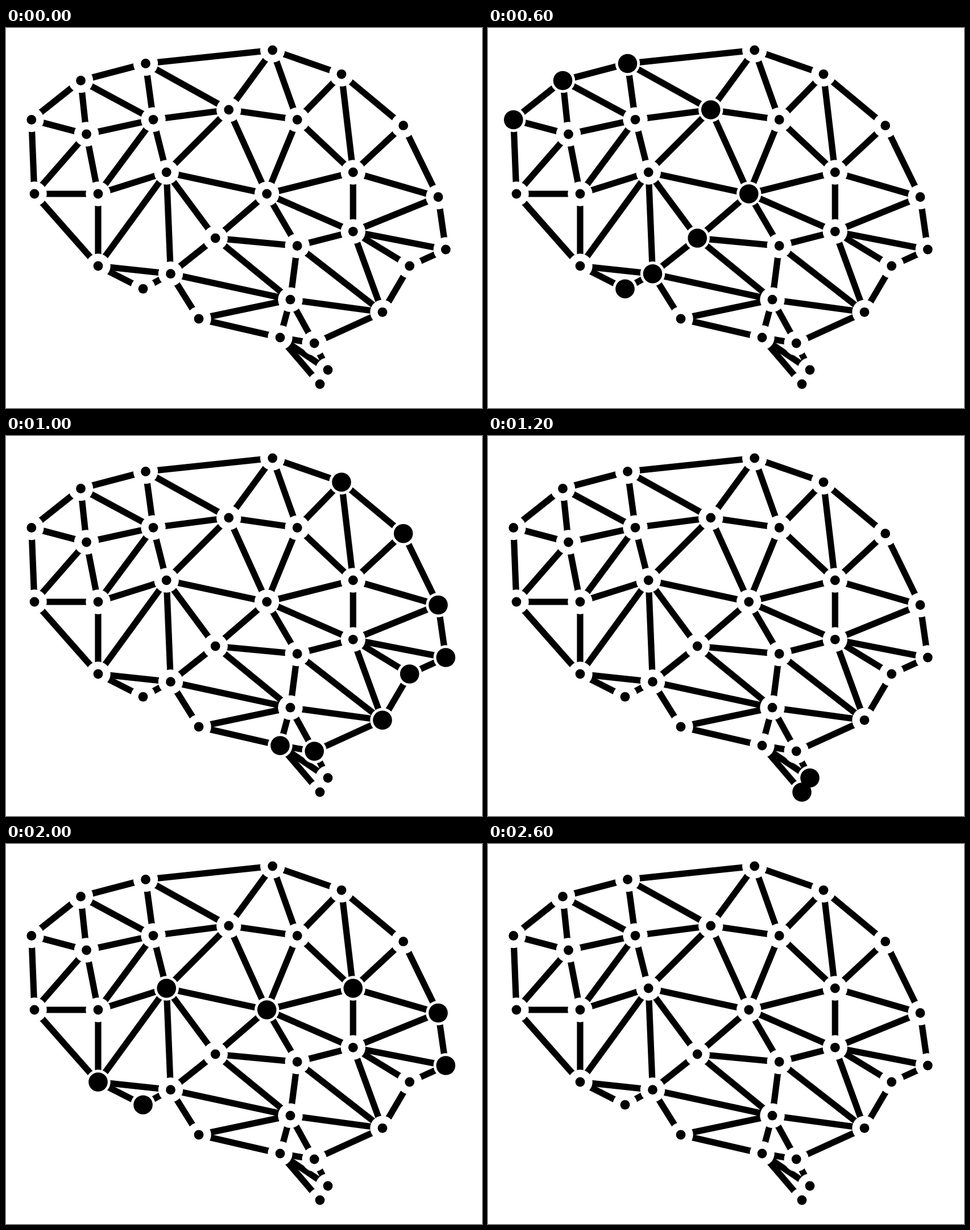
Write an HTML page that moves like this. It is 837 px wide and 669 px high and loops after 2800 ms.

```html
<!DOCTYPE html>
<html lang="en">
<head>
<meta charset="utf-8">
<title>Neural network brain</title>
<style>
  html, body { margin: 0; width: 100%; height: 100%; overflow: hidden; background: #fff; }
  svg { display: block; width: 100%; height: 100%; }
</style>
</head>
<body>
<svg id="stage" viewBox="0 0 837 669"></svg>
<script>
const STEP = 200, STEPS = 14;
const SMALL = 8.4, BIG = 16.8, HALO = 21.7, LINE = 11.2;

const points = text => text.split(' ').map(p => p.split(',').map(Number));
const range = (from, to) => Array.from({ length: to - from }, (_, i) => from + i);

// Rim of the brain, the chain just inside it, then the remaining nodes
const rim = points('50,292 44.8,161.5 131.5,92.5 245.5,62.5 468.7,39 590,81.3 698.7,171.7 ' +
  '760,297.5 773.3,390 709.7,419 662,500.3 542.2,555 482,545 339,512');
const chain = points('162,292 141.5,187 259,161.3 391.7,144 512.2,161.5 610.3,254 ' +
  '610.3,358.3 512.2,383.5 500,478.2');
const rest = points('282.2,254 368.2,370 458.7,292 289.5,432.7 241,459.2 162,419 566,602 552,627');
const nodes = [...rim, ...chain, ...rest];

const links = [];
function link(a, b) {
  const pair = [Math.min(a, b), Math.max(a, b)];
  if (!links.some(l => l[0] === pair[0] && l[1] === pair[1])) links.push(pair);
}
const path = ids => ids.slice(1).forEach((id, i) => link(ids[i], id));
const gap = (a, b) => a in nodes && b in nodes
  ? Math.hypot(nodes[a][0] - nodes[b][0], nodes[a][1] - nodes[b][1]) : Infinity;

// Triangulate between two chains, always taking the shorter next rung
function zip(left, right) {
  path(left);
  path(right);
  let i = 0, j = 0;
  link(left[0], right[0]);
  while (i < left.length - 1 || j < right.length - 1) {
    if (gap(left[i + 1], right[j]) < gap(left[i], right[j + 1])) i++; else j++;
    link(left[i], right[j]);
  }
}
function fan(hub, ids) {
  path(ids);
  ids.forEach(id => link(hub, id));
}

zip(range(0, 14), range(14, 23));
fan(25, [23, ...range(17, 22), 24, 23]);
fan(26, [13, 22, 24, 23, 28, 27]);
fan(14, [0, 28, 23, 16]);
fan(12, [11, 29, 30]);

// Number of links from the nearest seed to every node; one link carries no pulse
const live = links.filter(([a, b]) => !(a === 5 && b === 19));
function spread(seeds) {
  const level = nodes.map((_, i) => seeds.includes(i) ? 0 : -1);
  for (let depth = 0; level.includes(depth); depth++) {
    for (const [a, b] of live) {
      if (level[a] === depth && level[b] < 0) level[b] = depth + 1;
      if (level[b] === depth && level[a] < 0) level[a] = depth + 1;
    }
  }
  return level;
}
const outward = spread([14]);
const back = spread([29, 30]);

const stage = document.getElementById('stage');
function add(tag, attrs) {
  const el = document.createElementNS('http://www.w3.org/2000/svg', tag);
  for (const key in attrs) el.setAttribute(key, attrs[key]);
  return stage.appendChild(el);
}
const circle = ([cx, cy], r, fill) => add('circle', { cx, cy, r, fill });

for (const [a, b] of links) {
  const [x1, y1] = nodes[a], [x2, y2] = nodes[b];
  add('line', { x1, y1, x2, y2, stroke: '#000', 'stroke-width': LINE });
}
nodes.forEach(p => circle(p, HALO, '#fff'));
const dots = nodes.map(p => circle(p, SMALL, '#000'));

function draw(time) {
  const step = Math.floor(time / STEP) % STEPS;
  dots.forEach((dot, i) => {
    const lit = outward[i] === step - 1 || back[i] === step - 6;
    dot.setAttribute('r', lit ? BIG : SMALL);
  });
}

const start = performance.now();
function tick() {
  draw(performance.now() - start);
  requestAnimationFrame(tick);
}
draw(0);
requestAnimationFrame(tick);
</script>
</body>
</html>
```
